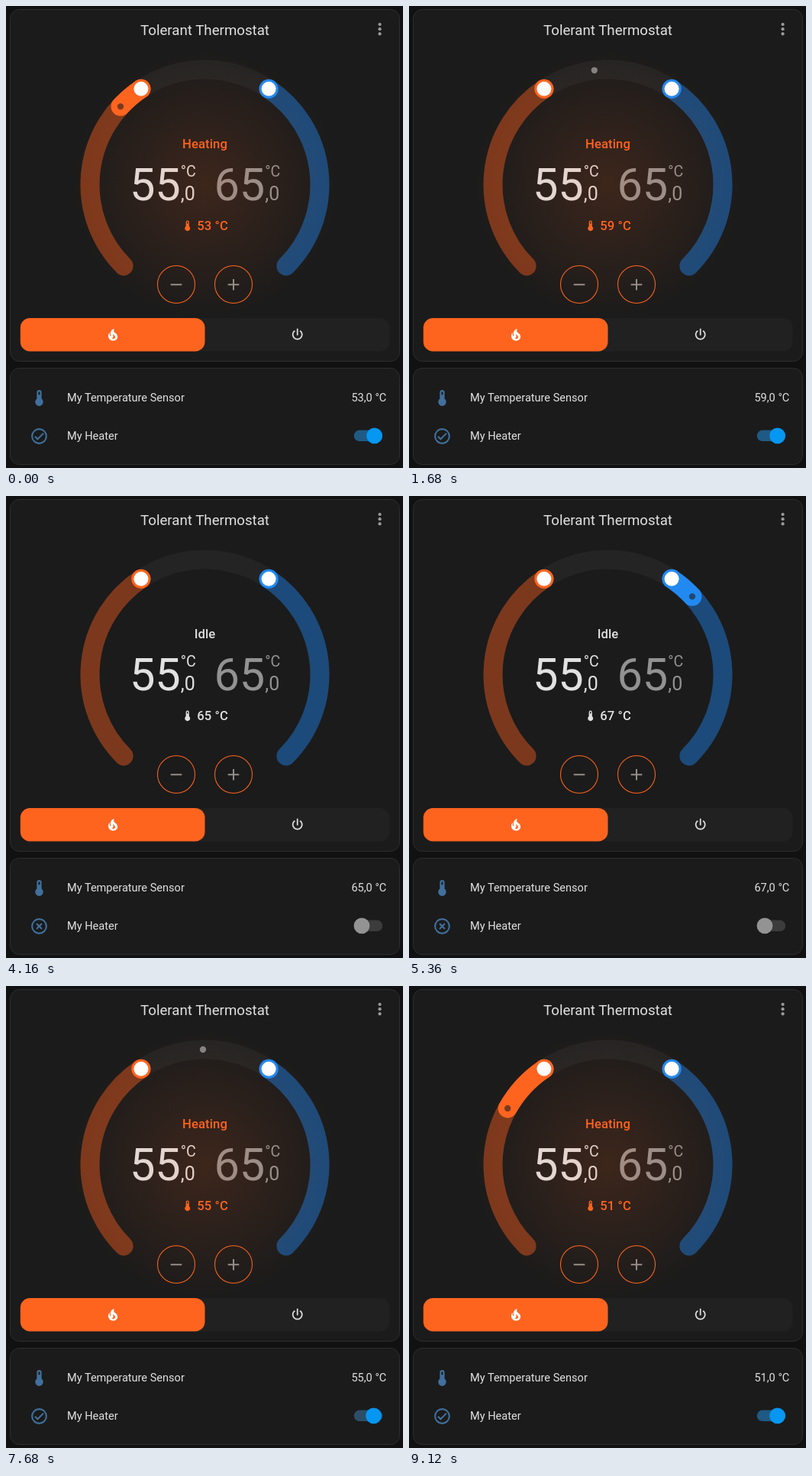
These frames come from a looping animation (520 px wide and 604 px high, 9200 ms). An HTML page:

```html
<!DOCTYPE html>
<html lang="en">
<head>
<meta charset="utf-8">
<title>Tolerant Thermostat</title>
<style>
  html, body { margin: 0; width: 100%; height: 100%; overflow: hidden; background: #111; }
  svg { display: block; width: 520px; height: 604px; font-family: Roboto, sans-serif; fill: #e1e1e1; }
  .card { fill: #1b1b1b; stroke: #2d2d2d; }
  .title { font-size: 18.7px; }
  .row { font-size: 14.56px; }
  .label { font-size: 16.64px; font-weight: 500; letter-spacing: .1px; }
  .big { font-size: 59.5px; letter-spacing: -.25px; }
  .unit { font-size: 19.6px; }
  .decimal { font-size: 25px; }
  .ring path { fill: none; stroke-width: 25; stroke-linecap: round; }
  .round { fill: none; stroke: #ff641f; stroke-width: 1.04; }
  .sign { fill: none; stroke: #938d8a; stroke-width: 2; }
  .blue { fill: #41709c; }
</style>
</head>
<body>
<svg viewBox="0 0 520 604">
  <defs>
    <radialGradient id="glowFill">
      <stop offset="0" stop-color="#ff641f"/>
      <stop offset="1" stop-color="#ff641f" stop-opacity="0"/>
    </radialGradient>
    <path id="thermometer" fill-rule="evenodd" d="M15 13V5A3 3 0 0 0 9 5V13A5 5 0 1 0 15 13M12 4A1 1 0 0 1 13 5V8H11V5A1 1 0 0 1 12 4Z"/>
    <g id="setpoint">
      <text class="unit" x="228.8" y="222.8">°C</text>
      <text class="decimal" x="228.8" y="254">,0</text>
    </g>
  </defs>

  <rect class="card" x="5.5" y="4.5" width="510" height="460" rx="12"/>
  <rect class="card" x="5.5" y="473.5" width="510" height="126" rx="12"/>

  <text class="title" x="260.5" y="38.3" text-anchor="middle">Tolerant Thermostat</text>
  <g fill="#9b9b9b">
    <circle cx="489.6" cy="24" r="2.1"/><circle cx="489.6" cy="30.2" r="2.1"/><circle cx="489.6" cy="36.4" r="2.1"/>
  </g>

  <g class="ring">
    <path id="track" stroke="#242424"/>
    <path id="lowArc" stroke="#7c381c"/>
    <path id="highArc" stroke="#1c4a7a"/>
    <path id="activeArc"/>
    <circle id="dot" r="4.15"/>
    <g id="lowHandle"><circle r="12.6" fill="#ff641f"/><circle r="9.5" fill="#fff"/></g>
    <g id="highHandle"><circle r="12.6" fill="#2289f0"/><circle r="9.5" fill="#fff"/></g>
  </g>

  <text id="action" class="label" x="260.5" y="185.7" text-anchor="middle"></text>
  <text class="big" x="162" y="254">55</text>
  <use href="#setpoint"/>
  <g opacity=".6">
    <text class="big" x="272.5" y="254">65</text>
    <use href="#setpoint" x="110.5"/>
  </g>
  <g id="current">
    <use href="#thermometer" transform="translate(229.4 279) scale(.693)"/>
    <text id="currentText" class="label" x="250.2" y="292.5"></text>
  </g>

  <circle class="round" cx="223" cy="364" r="24.5"/>
  <circle class="round" cx="298" cy="364" r="24.5"/>
  <path class="sign" d="M215.7 364.3h14.6M290.7 364.3h14.6M298 357v14.6"/>
  <circle id="glow" cx="260.5" cy="233.5" r="176" fill="url(#glowFill)" opacity=".15"/>

  <rect x="18.8" y="408" width="483.7" height="43.5" rx="12.5" fill="#212121"/>
  <rect x="18.8" y="408" width="241.7" height="43.5" rx="12.5" fill="#ff641f"/>
  <path fill="#fff" fill-rule="evenodd" transform="translate(129.6 419.4) scale(.867)"
    d="M17.7 11.2C16.9 10.2 15.7 9.6 14.8 8.7C13.3 7.3 13 4.9 14 3C9 4.3 7.4 9 9.1 13.2C9.4 14 8.4 14.4 8 13.8C6.9 12.3 6.7 10.3 7.4 8.6C5.8 10 4.9 12.3 5 14.5C5.3 18 8 20.6 11 20.9C17 21.5 20.6 17 18.4 12.5ZM14.5 17.5C13.3 18.5 11.6 18.3 10.5 17.3C11.7 17 12.4 16.1 12.6 15.2C12.8 14.2 11.9 12.7 12.5 10.9C13.2 12.7 15 13 15.4 14.8C15.6 15.8 15.2 16.8 14.5 17.5Z"/>
  <path transform="translate(371.3 419.2) scale(.867)"
    d="M16.56 5.44L15.11 6.89C16.84 7.94 18 9.83 18 12A6 6 0 0 1 6 12C6 9.83 7.16 7.94 8.88 6.88L7.44 5.44C5.36 6.88 4 9.28 4 12A8 8 0 0 0 20 12C20 9.28 18.64 6.88 16.56 5.44M13 3H11V13H13Z"/>

  <use class="blue" href="#thermometer" transform="translate(31 500) scale(1.04)"/>
  <text class="row" x="80" y="517">My Temperature Sensor</text>
  <text id="sensor" class="row" x="498.3" y="517" text-anchor="end"></text>

  <g fill="none" stroke="#41709c" stroke-width="2" transform="translate(31 550) scale(1.04)">
    <circle cx="12" cy="12" r="9"/>
    <path id="heaterMark"/>
  </g>
  <text class="row" x="80" y="567">My Heater</text>
  <rect id="switchTrack" x="455.7" y="554.5" width="37.5" height="14.6" rx="7.3"/>
  <circle id="switchThumb" cy="561.8" r="10.4"/>
</svg>

<script>
const LOOP = 9200, FRAME = 80;
const LOW = 55, HIGH = 65;
const READINGS = [53, 56, 59, 61, 65, 67, 64, 60, 55, 51];
const FIRST_CHANGE = 224, INTERVAL = 1060;
const HEATER_OFF = 4, HEATER_ON = 8; // indices of the readings that flip the heater
const GLIDE = 300, SWITCH = 60;
const ORANGE = '#ff641f', BLUE = '#2289f0', WHITE = '#e1e1e1';

const el = id => document.getElementById(id);
const set = (id, attrs) => {
  for (const name in attrs) el(id).setAttribute(name, attrs[name]);
};
const mix = (a, b, p) => a + (b - a) * p;
const clamp = x => Math.min(1, Math.max(0, x));

// cubic-bezier(.42, 0, .58, 1)
function easeInOut(x) {
  let lo = 0, hi = 1;
  for (let i = 0; i < 20; i++) {
    const s = (lo + hi) / 2;
    const at = 1.26 * s * (1 - s) ** 2 + 1.74 * s * s * (1 - s) + s ** 3;
    if (at < x) lo = s; else hi = s;
  }
  return lo * lo * (3 - 2 * lo);
}

// The dial spans 40 to 80 degrees over 270 degrees of arc.
function dialPoint(value) {
  const a = (value - 60) * 6.75 * Math.PI / 180;
  return [260.5 + 150.5 * Math.sin(a), 233.5 - 150.5 * Math.cos(a)];
}
function arc(from, to) {
  const large = (to - from) * 6.75 > 180 ? 1 : 0;
  return `M${dialPoint(from)}A150.5 150.5 0 ${large} 1 ${dialPoint(to)}`;
}
const place = (id, value) => set(id, { transform: `translate(${dialPoint(value)})` });

set('track', { d: arc(40, 80) });
set('lowArc', { d: arc(40, LOW) });
set('highArc', { d: arc(HIGH, 80) });
place('lowHandle', LOW);
place('highHandle', HIGH);

function draw(t) {
  const index = Math.max(0, Math.floor((t - FIRST_CHANGE) / INTERVAL) + 1);
  const age = t - FIRST_CHANGE - (index - 1) * INTERVAL;
  const reading = READINGS[index];
  const previous = READINGS[Math.max(0, index - 1)];
  const value = mix(previous, reading, easeInOut(clamp(age / GLIDE)));
  const heating = index < HEATER_OFF || index >= HEATER_ON;
  const below = value < LOW, above = value > HIGH;

  set('activeArc', {
    d: below ? arc(value, LOW) : above ? arc(HIGH, value) : '',
    stroke: below ? ORANGE : BLUE
  });
  place('dot', value);
  set('dot', below || above
    ? { fill: '#1c1c1c', opacity: .6 }
    : { fill: WHITE, opacity: .5 });

  const tint = heating ? ORANGE : WHITE;
  el('action').textContent = heating ? 'Heating' : 'Idle';
  set('action', { fill: tint });
  set('current', { fill: tint });
  el('currentText').textContent = `${reading} °C`;
  el('sensor').textContent = `${reading},0 °C`;
  set('glow', { visibility: heating ? 'visible' : 'hidden' });

  const flipping = index === HEATER_OFF || index === HEATER_ON;
  const progress = flipping ? clamp(age / SWITCH) : 1;
  const on = heating ? progress : 1 - progress;
  const slide = 1 - (1 - progress) ** 3;
  set('heaterMark', { d: heating ? 'M6.7 12.3L10 15.6L17.3 8.3' : 'M8.7 8.7L15.3 15.3M15.3 8.7L8.7 15.3' });
  set('switchTrack', { fill: `rgb(${mix(60, 31, on)},${mix(60, 90, on)},${mix(60, 132, on)})` });
  set('switchThumb', {
    cx: mix(466, 482.6, heating ? slide : 1 - slide),
    fill: heating ? '#0597f2' : '#939393'
  });
}

const start = performance.now();
function tick() {
  const t = (performance.now() - start) % LOOP;
  draw(Math.floor(t / FRAME) * FRAME);
  requestAnimationFrame(tick);
}
tick();
</script>
</body>
</html>
```
